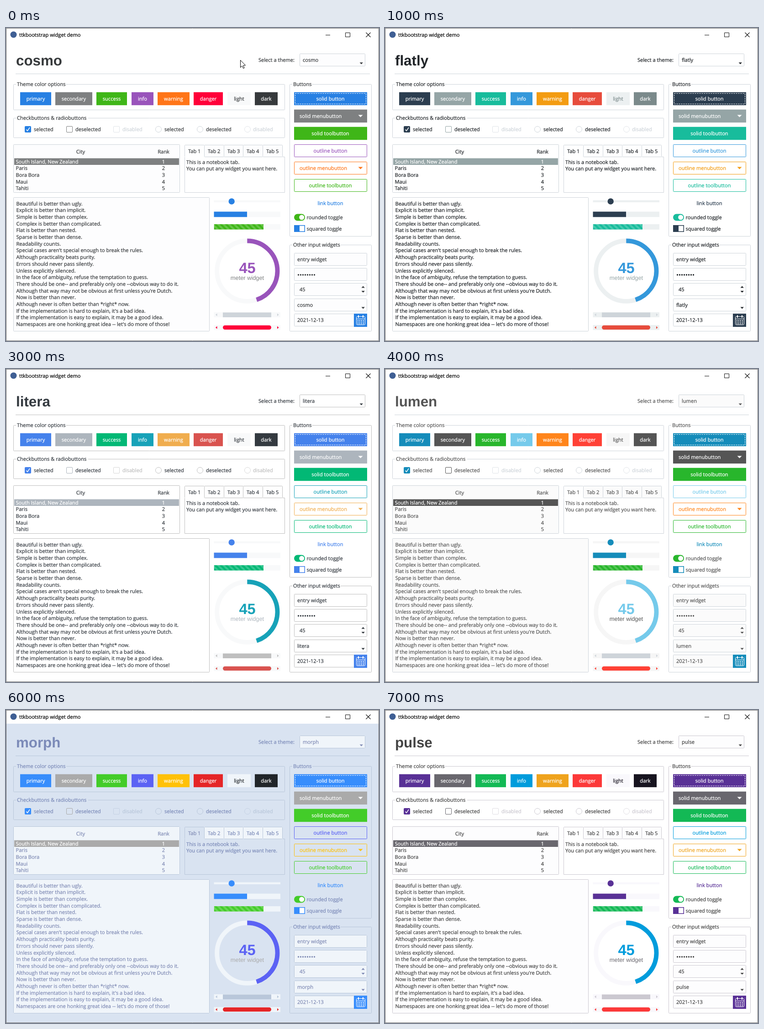
These frames come from a looping animation (817 px wide and 686 px high, 8000 ms). An HTML page with a canvas:

```html
<!DOCTYPE html>
<html lang="en">
<head>
<meta charset="utf-8">
<title>ttkbootstrap widget demo</title>
<style>
html, body { margin: 0; width: 817px; height: 686px; overflow: hidden; background: #fff; }
canvas { display: block; }
</style>
</head>
<body>
<canvas id="stage" width="817" height="686"></canvas>
<script>
const ctx = document.getElementById('stage').getContext('2d');
const THEME_MS = 1000;
const UI_FONT = '11.1px "Open Sans", sans-serif';
const SANS = '"Liberation Sans", Arial, sans-serif';

// name: primary secondary success info warning danger light dark | bg fg border inputFg inputBg
const themes = Object.entries({
  cosmo: '2780e3 7e8081 3fb618 9954bb ff7518 ff0039 f8f9fa 373a3c ffffff 373a3c ced4da 373a3c fdfdfe',
  flatly: '2c3e50 95a5a6 18bc9c 3498db f39c12 e74c3c ecf0f1 7b8a8b ffffff 212529 ced4da 212529 ffffff',
  journal: 'eb6864 aaaaaa 22b24c 336699 f5e625 f57a00 f8f9fa 222222 ffffff 222222 ced4da 565656 ffffff',
  litera: '4582ec adb5bd 02b875 17a2b8 f0ad4e d9534f f8f9fa 343a40 ffffff 343a40 bfbfbf 343a40 ffffff',
  lumen: '158cba 555555 28b62c 75caeb ff851b ff4136 f6f6f6 555555 ffffff 555555 ced4da 555555 fbfbfb',
  minty: '78c2ad f3969a 56cc9d 6cc3d5 ffce67 ff7851 f8f9fa 343a40 ffffff 5a5a5a ced4da 696969 ffffff',
  morph: '378dfc aaaaaa 43cc29 5b62f4 ffc107 e52527 f0f5fa 212529 d9e3f1 7b8ab8 b9c7da 7f8ab4 f0f5fa',
  pulse: '593196 69676e 13b955 009cdc efa31d fc3939 f9f8fc 17141f ffffff 444444 cbc8d0 444444 fdfdfe'
}).map(([name, list]) => {
  const [primary, secondary, success, info, warning, danger, light, dark, bg, fg, border, inputFg, inputBg] =
    list.split(' ').map(hex => '#' + hex);
  return { name, primary, secondary, success, info, warning, danger, light, dark, bg, fg, border, inputFg, inputBg };
});

const zen = [
  'Beautiful is better than ugly.',
  'Explicit is better than implicit.',
  'Simple is better than complex.',
  'Complex is better than complicated.',
  'Flat is better than nested.',
  'Sparse is better than dense.',
  'Readability counts.',
  "Special cases aren't special enough to break the rules.",
  'Although practicality beats purity.',
  'Errors should never pass silently.',
  'Unless explicitly silenced.',
  'In the face of ambiguity, refuse the temptation to guess.',
  'There should be one-- and preferably only one --obvious way to do it.',
  "Although that way may not be obvious at first unless you're Dutch.",
  'Now is better than never.',
  'Although never is often better than *right* now.',
  "If the implementation is hard to explain, it's a bad idea.",
  'If the implementation is easy to explain, it may be a good idea.',
  "Namespaces are one honking great idea -- let's do more of those!"
];
const cities = ['South Island, New Zealand', 'Paris', 'Bora Bora', 'Maui', 'Tahiti'];
const LINE = 14.67;

// Rectangles take their left, top, right and bottom edges.
function fill(color, x, y, x2, y2) {
  ctx.fillStyle = color;
  ctx.fillRect(x, y, x2 - x, y2 - y);
}

function outline(color, x, y, x2, y2, radius = 0) {
  ctx.strokeStyle = color;
  ctx.lineWidth = 1;
  ctx.beginPath();
  ctx.roundRect(x + 0.5, y + 0.5, x2 - x - 1, y2 - y - 1, radius);
  ctx.stroke();
}

function panel(bg, border, ...edges) {
  fill(bg, ...edges);
  outline(border, ...edges, 1);
}

function pill(color, x, y, x2, y2) {
  ctx.fillStyle = color;
  ctx.beginPath();
  ctx.roundRect(x, y, x2 - x, y2 - y, (y2 - y) / 2);
  ctx.fill();
}

function disc(color, x, y, r) {
  ctx.fillStyle = color;
  ctx.beginPath();
  ctx.arc(x, y, r, 0, Math.PI * 2);
  ctx.fill();
}

function polygon(color, ...points) {
  ctx.fillStyle = color;
  ctx.beginPath();
  points.forEach(([x, y]) => ctx.lineTo(x, y));
  ctx.closePath();
  ctx.fill();
}

function line(color, width, ...points) {
  ctx.strokeStyle = color;
  ctx.lineWidth = width;
  ctx.beginPath();
  points.forEach(([x, y], i) => i ? ctx.lineTo(x, y) : ctx.moveTo(x, y));
  ctx.stroke();
}

// Centres a line of text vertically around y; the hairline stroke firms up thin stems.
function text(str, x, y, color, align = 'left') {
  ctx.font = UI_FONT;
  ctx.textAlign = align;
  ctx.fillStyle = ctx.strokeStyle = color;
  ctx.lineWidth = 0.25;
  ctx.fillText(str, x, y + 3.8);
  ctx.strokeText(str, x, y + 3.8);
}

function sansText(str, style, x, baseline, color, align) {
  ctx.font = `${style} ${SANS}`;
  ctx.textAlign = align;
  ctx.fillStyle = color;
  ctx.fillText(str, x, baseline);
}

// A vertical arrow; a negative height points up.
function arrow(color, x, y, half, height) {
  polygon(color, [x - half, y], [x + half, y], [x, y + height]);
}

function group(c, label, x, y, x2, y2, gapEnd) {
  outline(c.border, x, y, x2, y2, 1);
  fill(c.bg, x + 6, y - 1, gapEnd, y + 2);
  text(label, x + 8, y, c.fg);
}

function titleBar() {
  fill('#fff', 0, 0, 817, 30);
  disc('#3f5f94', 16.5, 14.5, 7);
  text('ttkbootstrap widget demo', 29, 15.5, '#000');
  line('#111', 1, [700, 15.5], [710, 15.5]);
  outline('#111', 743, 10, 754, 20);
  line('#111', 1.1, [788.5, 10], [798.5, 20]);
  line('#111', 1.1, [798.5, 10], [788.5, 20]);
}

function header(c) {
  sansText(c.name, 'bold 31.3px', 22, 81.5, c.fg, 'left');
  text('Select a theme:', 553, 70, c.fg);
  panel(c.inputBg, c.border, 643, 56, 787, 84);
  text(c.name, 650, 70.5, c.inputFg);
  arrow(c.inputFg, 778.3, 75.5, 3.7, 4);
  fill(c.border, 21, 100, 797, 101);
}

function colorButtons(c) {
  group(c, 'Theme color options', 16, 123, 611, 180, 132);
  const spans = { primary: [31, 99], secondary: [108, 189], success: [198, 265], info: [275, 323],
    warning: [332, 402], danger: [411, 475], light: [485, 536], dark: [545, 595] };
  for (const [name, [x, x2]] of Object.entries(spans)) {
    fill(c[name], x, 140.7, x2, 169.2);
    text(name, (x + x2) / 2, 155.5, name === 'light' ? c.dark : '#fff', 'center');
  }
}

function checks(c) {
  group(c, 'Checkbuttons & radiobuttons', 16, 197, 611, 241, 180);
  ctx.fillStyle = c.primary;
  ctx.beginPath();
  ctx.roundRect(41, 215, 14, 14, 2);
  ctx.fill();
  line('#fff', 1.4, [44.5, 222.5], [47, 225.5], [52, 218]);
  outline(c.secondary, 132, 215, 146, 229, 1.5);
  ctx.globalAlpha = 0.6;
  outline(c.border, 235, 215, 249, 229, 1.5);
  [334, 425, 529].forEach((x, i) => {
    ctx.globalAlpha = i === 2 ? 0.6 : 1;
    outline(c.border, x - 7, 215, x + 7, 229, 6.5);
  });
  ctx.globalAlpha = 1;
  [61, 347].forEach(x => text('selected', x, 222.5, c.fg));
  [152, 438].forEach(x => text('deselected', x, 222.5, c.fg));
  [255, 541].forEach(x => text('disabled', x, 222.5, c.border));
}

function table(c) {
  panel(c.inputBg, c.border, 16, 255, 381, 361);
  text('City', 163.5, 271.5, c.inputFg, 'center');
  text('Rank', 345, 271.5, c.inputFg, 'center');
  fill(c.secondary, 18, 285.5, 379, 300);
  cities.forEach((city, i) => {
    const y = 293 + i * LINE, color = i ? c.inputFg : '#fff';
    text(city, 21.5, y, color);
    text(i + 1, 345, y, color, 'center');
  });
}

function notebook(c) {
  outline(c.border, 391, 282, 611, 361);
  for (let i = 0; i < 5; i++) {
    const x = Math.round(391 + i * 42.8);
    panel(i ? c.inputBg : c.bg, c.border, x, 256, x + 44, 283);
    text('Tab ' + (i + 1), x + 21.7, 270.5, i ? c.fg : c.inputFg, 'center');
  }
  fill(c.bg, 392, 281, 434, 284);
  text('This is a notebook tab.', 395, 294, c.fg);
  text('You can put any widget you want here.', 395, 308.5, c.fg);
}

function textArea(c) {
  panel(c.inputBg, c.border, 16, 371, 446, 665);
  zen.forEach((row, i) => text(row, 22.5, 385 + i * LINE, c.inputFg));
}

function stripes(color, x, y, x2, y2) {
  const size = y2 - y;
  ctx.save();
  ctx.beginPath();
  ctx.rect(x, y, x2 - x, size);
  ctx.clip();
  fill(color, x, y, x2, y2);
  for (let s = x - size * 1.5; s < x2; s += size) {
    polygon('rgba(255,255,255,.2)', [s, y], [s + size / 2, y], [s + size * 1.5, y2], [s + size, y2]);
  }
  ctx.restore();
}

function scrollbar(c, y, arrowColor) {
  fill(c.light, 455.5, y, 601, y + 11);
  const mid = y + 5.5;
  polygon(arrowColor, [462.5, mid - 3], [462.5, mid + 3], [459, mid]);
  polygon(arrowColor, [594, mid - 3], [594, mid + 3], [597.5, mid]);
}

function gauges(c) {
  fill(c.light, 455.5, 377.5, 601, 382);
  disc(c.primary, 494.2, 380, 6.7);
  fill(c.light, 455.5, 402.5, 601, 414.3);
  fill(c.primary, 455.5, 402.5, 528, 414.3);
  fill(c.light, 455.5, 430, 601, 441.8);
  stripes(c.success, 455.5, 430, 564, 441.8);

  const top = -Math.PI / 2;
  [[c.light, 1], [c.info, 0.45]].forEach(([color, part]) => {
    ctx.strokeStyle = color;
    ctx.lineWidth = 9.8;
    ctx.beginPath();
    ctx.arc(528.3, 532.7, 66.2, top, top + part * Math.PI * 2);
    ctx.stroke();
  });
  sansText('45', 'bold 32.6px', 528.5, 537.3, c.info, 'center');
  sansText('meter widget', '12.8px', 528.5, 552, c.secondary, 'center');

  scrollbar(c, 623, c.border);
  fill(c.border, 475, 623.5, 581, 634);
  scrollbar(c, 651, c.danger);
  pill(c.danger, 475, 651.7, 581, 661);
}

function button(c, label, y, name, { solid = false, menu = false } = {}) {
  const color = solid ? '#fff' : c[name];
  if (solid) fill(c[name], 631, y - 0.3, 791, y + 28.2);
  else outline(c[name], 631, y, 791, y + 28, 1);
  if (menu) {
    text(label, 643, y + 14.5, color);
    arrow(color, 776.5, y + 11.5, 5, 5);
  } else {
    text(label, 710.5, y + 14.5, color, 'center');
  }
}

function buttons(c) {
  group(c, 'Buttons', 621, 123, 801, 457, 671);
  button(c, 'solid button', 141, 'primary', { solid: true });
  ctx.setLineDash([3, 2]);
  outline('#fff', 633, 143, 789, 167);
  ctx.setLineDash([]);
  button(c, 'solid menubutton', 179, 'secondary', { solid: true, menu: true });
  button(c, 'solid toolbutton', 217, 'success', { solid: true });
  button(c, 'outline button', 255, 'info');
  button(c, 'outline menubutton', 293, 'warning', { menu: true });
  button(c, 'outline toolbutton', 331, 'success');
  text('link button', 710.5, 384, c.primary, 'center');
  pill(c.success, 631, 407.5, 655, 422.5);
  disc('#fff', 647.7, 415, 5.5);
  text('rounded toggle', 658.5, 415.5, c.fg);
  fill(c.primary, 631, 432, 655, 447);
  fill('#fff', 643, 433.5, 653.5, 445.5);
  text('squared toggle', 658.5, 440, c.fg);
}

function calendarIcon() {
  outline('#fff', 767, 632, 787, 651, 2);
  fill('#fff', 768, 637, 786, 638);
  [771, 781].forEach(x => fill('#fff', x, 629.5, x + 2, 635));
  for (let row = 0; row < 3; row++) {
    for (let col = 0; col < 4; col++) {
      const x = 770 + col * 4, y = 640 + row * 3.5;
      fill('#fff', x, y, x + 2, y + 2);
    }
  }
}

function inputs(c) {
  group(c, 'Other input widgets', 621, 475, 801, 665, 733);
  [493, 526, 559, 593].forEach(y => panel(c.inputBg, c.border, 631, y, 791, y + 28));
  panel(c.inputBg, c.border, 631, 626, 763, 654);
  text('entry widget', 638, 507.5, c.inputFg);
  for (let i = 0; i < 8; i++) disc(c.inputFg, 640.5 + i * 5, 541, 1.7);
  text('45', 643, 573.5, c.inputFg);
  arrow(c.inputFg, 782.2, 569.5, 3.7, -4);
  arrow(c.inputFg, 782.2, 576, 3.7, 4);
  text(c.name, 638, 607, c.inputFg);
  arrow(c.inputFg, 782.2, 611.5, 3.7, 4);
  text('2021-12-13', 638, 640, c.inputFg);
  fill(c.primary, 762, 626, 791, 655);
  calendarIcon();
}

function pointer(x, y) {
  const shape = [[0, 0], [0, 16], [3.6, 12.6], [6.2, 18], [8.6, 17], [6.2, 11.6], [11, 11.3]]
    .map(([dx, dy]) => [x + dx, y + dy]);
  polygon('#fff', ...shape);
  line('#000', 1, ...shape, shape[0]);
}

function draw(index) {
  const c = themes[index];
  ctx.textRendering = 'geometricPrecision';
  ctx.lineJoin = 'round';
  fill(c.bg, 0, 0, 817, 686);
  titleBar();
  [header, colorButtons, checks, table, notebook, textArea, gauges, buttons, inputs].forEach(part => part(c));
  if (index === 0) pointer(513.5, 70.5);
  outline('#6b6b6b', 0, 0, 817, 686);
}

function tick() {
  draw(Math.floor(performance.now() / THEME_MS) % themes.length);
  requestAnimationFrame(tick);
}
tick();
</script>
</body>
</html>
```
